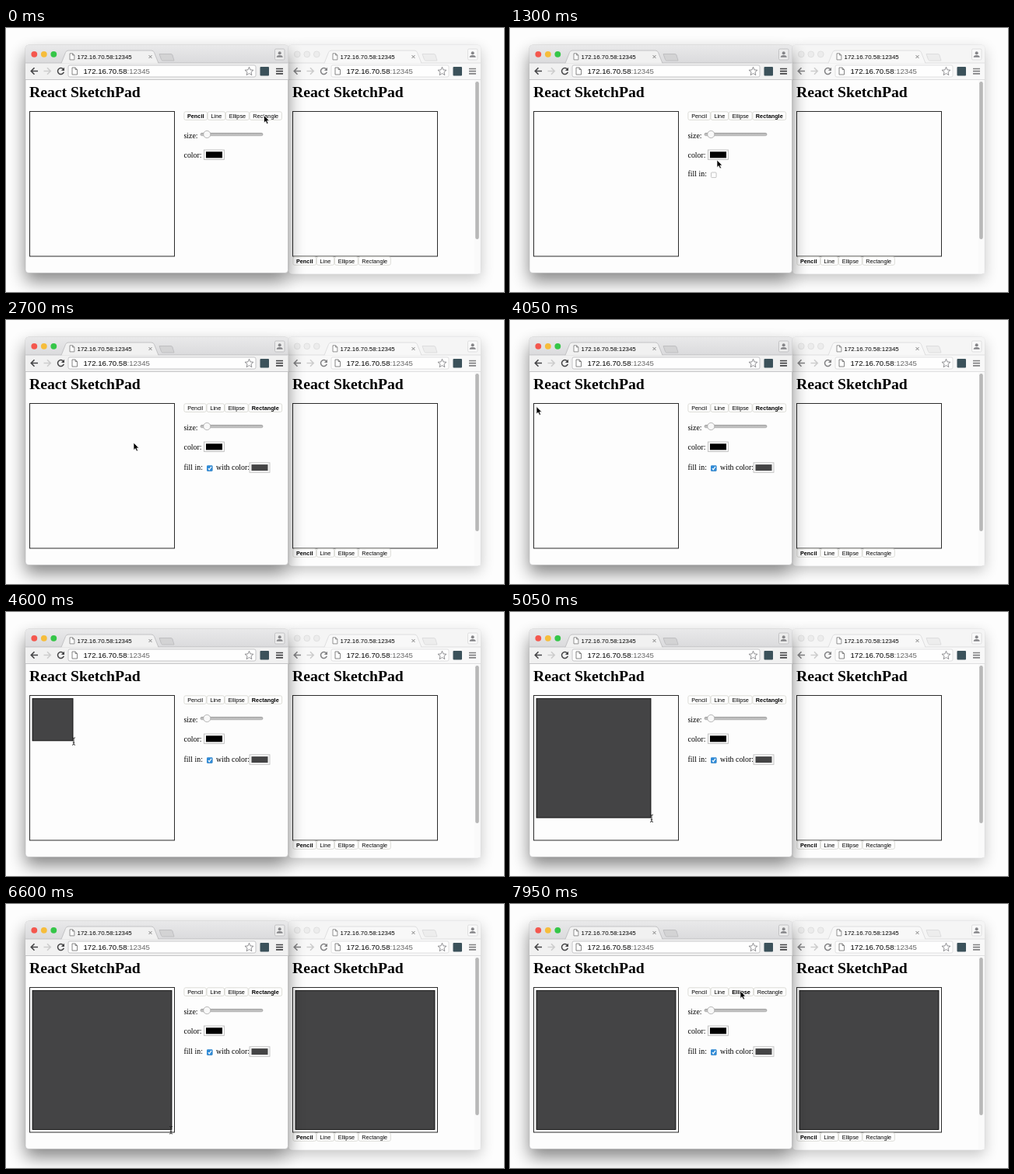
An HTML page that plays this animation: 640 by 340 pixels, repeating every 8000 ms.

```html
<!DOCTYPE html>
<html lang="en">
<head>
<meta charset="utf-8">
<title>React SketchPad</title>
<style>
  html, body { margin: 0; width: 100%; height: 100%; overflow: hidden; background: #fdfdfd; }
  svg { display: block; width: 100vw; height: 100vh; }
  text { fill: #000; white-space: pre; }
  .ui { font-family: "Liberation Sans", Arial, sans-serif; }
  .serif { font-family: "Liberation Serif", "Times New Roman", serif; font-size: 9.9px; }
  .title { font-size: 19.7px; font-weight: bold; }
  .btn text { font-size: 7.3px; }
</style>
</head>
<body>
<svg id="stage" viewBox="0 0 640 340"></svg>
<script>
const LOOP = 8000;
const FILL = '#444445';
const LINE = '#d3d3cd';
const stage = document.getElementById('stage');

const rect = (x, y, w, h, fill, extra = '') =>
  `<rect x="${x}" y="${y}" width="${w}" height="${h}" fill="${fill}" ${extra}/>`;
const path = (d, stroke, width = 1, fill = 'none') =>
  `<path d="${d}" fill="${fill}" stroke="${stroke}" stroke-width="${width}"/>`;
const text = (x, y, str, cls, extra = '') =>
  `<text x="${x}" y="${y}" class="${cls}" ${extra}>${str}</text>`;

const pageIcon = (x, y, s) =>
  `<g transform="translate(${x} ${y}) scale(${s})">` +
  path('M0 0H4L6.5 2.5V9H0Z M4 0V2.5H6.5', '#777', 0.9, '#fff') + '</g>';

function starPath(cx, cy, r) {
  const pts = Array.from({ length: 10 }, (_, i) => {
    const a = i * Math.PI / 5 - Math.PI / 2, d = i % 2 ? r * 0.45 : r;
    return `${(cx + d * Math.cos(a)).toFixed(2)} ${(cy + d * Math.sin(a)).toFixed(2)}`;
  });
  return `M${pts.join('L')}Z`;
}

// Browser frame: dx moves left-aligned parts, rx right-aligned parts.
function browser({ dx, rx, left, right, bottom, active }) {
  const dark = active ? '#454547' : '#828284';
  const lights = active ? ['#f4574e', '#f6bd3b', '#35c648'] : Array(3).fill('#ececec');
  const bar = active ? 'url(#bar)' : '#f5f5f5';
  const tool = active ? '#f1f1f1' : '#f8f8f8';
  const edge = active ? '#b9b9bb' : '#d9d9da';
  const w = right - left;
  return rect(left, 22, w, bottom - 22, '#fdfdfd', `rx="4" stroke="${edge}" stroke-width=".6"`) +
    path(`M${left} 46V26Q${left} 22 ${left + 4} 22H${right - 4}Q${right} 22 ${right} 26V46Z`, 'none', 0, bar) +
    rect(left, 45, w, 21.5, tool) +
    path(`M${left} 45H${right}M${left} 66.5H${right}`, edge, 0.8) +
    `<g transform="translate(${dx} 0)">` +
      lights.map((c, i) => `<circle cx="${36.3 + i * 12.5}" cy="33.8" r="3.9" fill="${c}" ` +
        `stroke="${active ? 'none' : '#d6d6d6'}" stroke-width=".6"/>`).join('') +
      path('M71 45.4L76.5 31.5Q77.5 29 80 29H187Q189.5 29 190.5 31.5L196 45.4', edge, 0.8, tool) +
      path('M197 33.5H212Q213.5 33.5 214 35L216 42H201.5Q200 42 199.5 40.5Z', edge, 0.8, active ? '#d3d3d4' : '#ededed') +
      pageIcon(82, 32.8, 0.9) +
      text(91.5, 40, '172.16.70.58:12345', 'ui', 'font-size="7.9"') +
      path('M183.5 35L187.5 39M187.5 35L183.5 39', '#777', 0.9) +
      path('M41 55.5H32.5M36.5 51.3L32.3 55.5L36.5 59.7', dark, 1.6) +
      path('M48.5 55.5H57M53 51.3L57.2 55.5L53 59.7', '#cdcdcd', 1.6) +
      path('M73.7 53.2A4 4 0 1 0 74.3 56.8', dark, 1.5) +
      path('M75 50.8V54.9H70.9Z', 'none', 0, dark) +
    '</g>' +
    rect(80 + dx, 48, 241 + rx - dx, 15, '#fefefe', `rx="2" stroke="${edge}" stroke-width=".8"`) +
    pageIcon(85 + dx, 51, 1) +
    text(99.5 + dx, 59, '172.16.70.58<tspan fill="#666">:12345</tspan>', 'ui', 'font-size="9.6"') +
    `<g transform="translate(${rx} 0)">` +
      path(starPath(312.5, 56, 5.7), '#77777a', 0.8, '#fff') +
      rect(326.5, 50, 11.5, 11.5, '#3b515a', 'rx="1"') +
      path('M347 52.5H356M347 55.7H356M347 58.9H356', dark, 1.7) +
      rect(345.5, 27, 12.5, 14, active ? '#ececec' : '#f9f9f9', `rx="1.5" stroke="${edge}" stroke-width=".8"`) +
      '<circle cx="351.7" cy="32.3" r="2" fill="#858588"/>' +
      path('M347.7 37.8Q347.7 35 351.7 35T355.7 37.8Z', 'none', 0, '#858588') +
    '</g>' +
    text(30 + dx, 89.3, 'React SketchPad', 'serif title') +
    rect(30.5 + dx, 107.5, 186, 186.5, '#fdfdfd', 'stroke="#2b2b2b" stroke-width="1"');
}

const tools = [['Pencil', 29.2, 30.4], ['Line', 23.2, 24], ['Ellipse', 30.6, 32.2], ['Rectangle', 42, 43.5]];

function toolRow(x, y, chosen) {
  return tools.map(([name, plain, bold]) => {
    const on = name === chosen, w = on ? bold : plain;
    const out = rect(x + 0.4, y, w - 0.8, 10.6, '#fefefe', `rx="2" stroke="${LINE}" stroke-width=".8"`) +
      text(x + w / 2, y + 8, name, 'ui', `text-anchor="middle" font-weight="${on ? 700 : 400}"`);
    x += w;
    return out;
  }).join('');
}

const swatch = (x, y, fill) =>
  rect(x + 0.5, y + 0.5, 26, 12.5, '#f7f7f7', 'stroke="#b9b9b9" stroke-width=".8"') +
  rect(x + 3, y + 2.8, 21, 8, fill);

stage.innerHTML = `
  <defs>
    <filter id="soft" x="-20%" y="-20%" width="140%" height="140%"><feGaussianBlur stdDeviation="9"/></filter>
    <filter id="deep" x="-20%" y="-20%" width="140%" height="140%"><feGaussianBlur stdDeviation="11"/></filter>
    <linearGradient id="bar" x2="0" y2="1"><stop stop-color="#e9e9ea"/><stop offset="1" stop-color="#dadadc"/></linearGradient>
    <linearGradient id="track" x2="0" y2="1"><stop stop-color="#a6a6a6"/><stop offset="1" stop-color="#d6d6d6"/></linearGradient>
  </defs>` +
  rect(0, 0, 640, 340, '#fdfdfd') +
  rect(363, 28, 247, 295, '#000', 'filter="url(#soft)" opacity=".22"') +
  browser({ dx: 338, rx: 248, left: 363, right: 610, bottom: 317, active: false }) +
  rect(602, 67, 7.5, 249, '#fafafa') +
  rect(603.2, 69, 4.6, 203, '#b8b8b8', 'rx="2.3"') +
  '<g id="copy">' + rect(372, 111.5, 179, 179, FILL, 'stroke="#000" stroke-width=".8"') + '</g>' +
  '<g class="btn">' + toolRow(368.5, 294.7, 'Pencil') + '</g>' +
  rect(25, 33, 337, 293, '#000', 'filter="url(#deep)" opacity=".48"') +
  browser({ dx: 0, rx: 0, left: 25, right: 362.5, bottom: 315.5, active: true }) +
  '<g id="tools" class="btn"></g>' +
  text(228.5, 141.5, 'size:', 'serif') +
  rect(250, 135.3, 80, 3.4, 'url(#track)', 'rx="1.7" stroke="#8e8e8e" stroke-width=".6"') +
  '<circle cx="258.3" cy="137" r="4.6" fill="#f8f8f8" stroke="#a6a6a6" stroke-width=".8"/>' +
  text(228.5, 166.5, 'color:', 'serif') + swatch(254, 156.5, '#000') +
  '<g id="fillRow">' +
    text(228.5, 191.2, 'fill in:', 'serif') +
    rect(258.5, 186, 6.6, 6.6, '#fefefe', 'rx="1" stroke="#b5b5b5" stroke-width=".8"') +
  '</g><g id="fillOn">' +
    rect(258, 187.2, 7.5, 7.5, '#2f8ad6', 'rx="1.2"') +
    path('M259.8 191.1L261.3 192.7L264 188.9', '#fff', 1.2) +
    text(270, 193.2, 'with color:', 'serif') + swatch(312.5, 183.3, FILL) +
  '</g>' +
  `<rect id="shape" x="34" y="111.5" fill="${FILL}" stroke="#000" stroke-width=".8"/>` +
  '<g id="arrow">' +
    path('M0 0V9.6L2.2 7.5L3.8 11L5.5 10.2L4 6.9H6.9Z', '#fff', 0.7, '#000') +
  '</g><g id="beam">' +
    path('M-2 -4.5Q0 -4.5 0 -3Q0 -4.5 2 -4.5M0 -3V3.5M-2 5Q0 5 0 3.5Q0 5 2 5M-1.2 1.8H1.2', '#222', 0.9) +
  '</g>';

const $ = id => document.getElementById(id);
const show = (id, on) => $(id).setAttribute('display', on ? 'inline' : 'none');
const move = (id, x, y) => $(id).setAttribute('transform', `translate(${x} ${y})`);

// Pointer stops: time, x, y.
const stops = [
  [0, 331.5, 112.5], [400, 331.5, 112.5], [1300, 266, 170], [1700, 261, 189], [2050, 261, 189],
  [2700, 164, 158], [3850, 34, 111.5], [4300, 34, 111.5], [5050, 181, 265],
  [5750, 213, 290.5], [6850, 213, 290.5], [7650, 296, 112], [LOOP, 296, 112]
];
const PRESS = 4300, RELEASE = 6200;

function pointer(t) {
  const i = stops.findIndex(s => s[0] > t);
  const [t0, x0, y0] = stops[i - 1], [t1, x1, y1] = stops[i];
  const p = (t - t0) / (t1 - t0), k = p * p * (3 - 2 * p);
  return [x0 + (x1 - x0) * k, y0 + (y1 - y0) * k];
}

let chosen = '';
function choose(name) {
  if (name === chosen) return;
  chosen = name;
  $('tools').innerHTML = toolRow(228.5, 107.8, name);
}

function draw(t) {
  const [x, y] = pointer(t);
  const filled = t >= 1900, drawn = t >= PRESS, beam = drawn && t < 6850;
  choose(t < 250 ? 'Pencil' : t < 7750 ? 'Rectangle' : 'Ellipse');
  show('fillRow', t >= 250);
  move('fillRow', 0, filled ? 2 : 0);
  show('fillOn', filled);
  show('copy', t >= RELEASE);
  show('shape', drawn);
  const [ex, ey] = pointer(Math.min(t, RELEASE));
  $('shape').setAttribute('width', Math.max(0, ex - 34));
  $('shape').setAttribute('height', Math.max(0, ey - 111.5));
  show('arrow', !beam);
  show('beam', beam);
  move('arrow', x, y);
  move('beam', x + (x < 200 ? 1 : -1), y + 0.5);
}

const start = performance.now();
function tick() {
  draw((performance.now() - start) % LOOP);
  requestAnimationFrame(tick);
}
tick();
</script>
</body>
</html>
```
